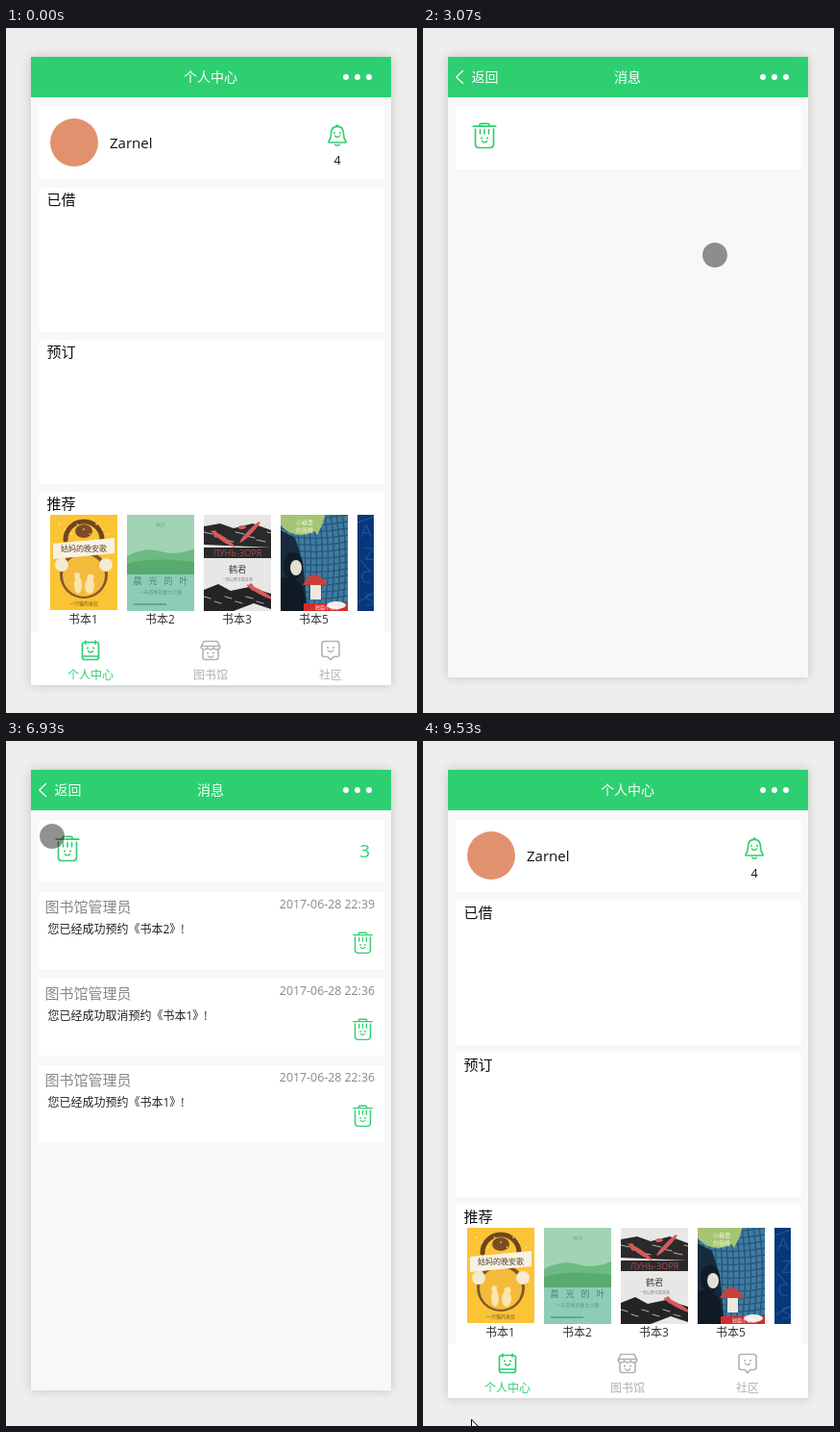
Recreate the animation shown at these times as an HTML page with a canvas. Size 428 px wide and 712 px high, loop 9.79 s.

```html
<!DOCTYPE html>
<html lang="zh-CN">
<head>
<meta charset="utf-8">
<title>个人中心</title>
<style>
html, body { margin: 0; width: 100%; height: 100%; overflow: hidden; background: #eee; }
canvas { display: block; width: 428px; height: 712px; }
</style>
</head>
<body>
<canvas id="stage"></canvas>
<script>
const W = 428, H = 712, LOOP = 9790, STEP = 1000 / 15;
const GREEN = '#2ecf71', GREY = '#b2b2b2', PAGE = '#f8f8f8';
const FONT = '"Open Sans", "Noto Sans CJK SC", "Noto Sans CJK", sans-serif';
const canvas = document.getElementById('stage');
const ctx = canvas.getContext('2d');
const dpr = window.devicePixelRatio || 1;
canvas.width = W * dpr;
canvas.height = H * dpr;

// Pointer path: time, x, y
const PATH = [
  [0, 500, 690], [70, 410, 586], [130, 370, 455], [200, 329, 270], [270, 350, 134],
  [330, 374, 141], [400, 374, 141], [730, 328, 108], [1800, 328, 108],
  [2330, 401, 195], [2400, 396, 205], [3070, 304, 236], [3600, 320, 236],
  [4000, 354, 218], [4130, 357, 204], [4200, 357, 204], [4270, 361, 201],
  [4870, 361, 201], [5200, 180, 145], [5470, 48, 99], [7800, 48, 99],
  [7870, 48, 81], [8070, 55, 60], [8270, 45, 44], [8530, 45, 44],
  [9000, 60, 350], [9530, 50, 705], [LOOP, 50, 705]
];

const NOTES = [
  ['取消预约《书本2》', '22:40'], ['预约《书本2》', '22:39'],
  ['取消预约《书本1》', '22:36'], ['预约《书本1》', '22:36']
];

function rect(x, y, w, h, color) {
  ctx.fillStyle = color;
  ctx.fillRect(x, y, w, h);
}

function disc(x, y, r, color) {
  ctx.fillStyle = color;
  ctx.beginPath();
  ctx.arc(x, y, r, 0, Math.PI * 2);
  ctx.fill();
}

function oval(x, y, rx, ry, color, turn = 0) {
  ctx.fillStyle = color;
  ctx.beginPath();
  ctx.ellipse(x, y, rx, ry, turn, 0, Math.PI * 2);
  ctx.fill();
}

function text(str, x, y, size, color, align = 'left') {
  ctx.font = size + 'px ' + FONT;
  ctx.textAlign = align;
  ctx.fillStyle = color;
  ctx.fillText(str, x, y);
}

function stroke(d, color, width) {
  ctx.strokeStyle = color;
  ctx.lineWidth = width;
  ctx.lineCap = ctx.lineJoin = 'round';
  ctx.stroke(new Path2D(d));
}

function fill(d, color) {
  ctx.fillStyle = color;
  ctx.fill(new Path2D(d));
}

function at(x, y, scale, draw) {
  ctx.save();
  ctx.translate(x, y);
  ctx.scale(scale, scale);
  draw();
  ctx.restore();
}

function clipped(x, y, w, h, draw) {
  ctx.save();
  ctx.beginPath();
  ctx.rect(x, y, w, h);
  ctx.clip();
  draw();
  ctx.restore();
}

function face(x, y, color) {
  disc(x - 3, y, 1.1, color);
  disc(x + 3, y, 1.1, color);
  stroke(`M${x - 2.6} ${y + 3}q2.6 3 5.2 0`, color, 1.4);
}

function trash(x, y, scale) {
  at(x, y, scale, () => {
    stroke('M.8 3.7H24.2M7.5 3.5V2Q7.5 .8 9 .8H16Q17.5 .8 17.5 2V3.5', GREEN, 1.7);
    stroke('M3 6.5V22Q3 26 7 26H18Q22 26 22 22V6.5', GREEN, 1.7);
    stroke('M8 7V11.5M12.5 7V11.5M17 7V11.5', GREEN, 1.6);
    face(12.5, 16, GREEN);
  });
}

function bell() {
  at(345, 111, 1, () => {
    stroke('M-1.5 -8.5Q0 -11.5 1.5 -8.5M-9 7Q-6.5 4 -6.5 -1C-6.5 -6 -4 -8.6 0 -8.6S6.5 -6 6.5 -1Q6.5 4 9 7Q9.5 8 8.3 8H-8.3Q-9.5 8 -9 7ZM-2.2 10.3Q0 11.8 2.2 10.3', GREEN, 1.6);
    face(0, -2, GREEN);
  });
}

function tabIcon(x, kind, color) {
  at(x, 647, 1, () => {
    if (kind === 0) {
      stroke('M-6 -8.5H6Q8.5 -8.5 8.5 -6V7Q8.5 9.5 6 9.5H-6Q-8.5 9.5 -8.5 7V-6Q-8.5 -8.5 -6 -8.5M-5 -10V-7M5 -10V-7M-8 6H8', color, 1.7);
      face(0, -2.5, color);
    } else if (kind === 1) {
      stroke('M-7 -9.5H7L9.8 -4Q9.8 -1 6.7 -1T3.3 -3Q3 -1 0 -1T-3.3 -3Q-3.5 -1 -6.7 -1T-9.8 -4ZM-8 0V7Q-8 9.5 -5.5 9.5H5.5Q8 9.5 8 7V0M-9 -4.5H9', color, 1.6);
      face(0, 2.7, color);
    } else {
      stroke('M-6.5 -9.5H6.5Q9 -9.5 9 -7V4Q9 6.5 6.5 6.5H3L0 9.7L-3 6.5H-6.5Q-9 6.5 -9 4V-7Q-9 -9.5 -6.5 -9.5', color, 1.6);
      face(0, -3, color);
    }
  });
}

const COVERS = [
  () => {
    rect(0, 0, 70, 99, '#fbc435');
    stroke('M16 26A19 19 0 0 1 54 26', '#70451f', 5);
    oval(35, 17, 9, 7, '#7b4d22');
    for (let i = 0; i < 9; i++) disc(9 + i * 6.5, 10 + (i % 3) * 5, .8, '#fff3c4');
    disc(35, 62, 25, '#80572c');
    disc(35, 63, 22, '#f4bb3b');
    disc(12, 52, 7, '#f5ead2');
    disc(58, 52, 7, '#f5ead2');
    fill('M3 30L67 24V40L3 46Z', '#f8f2e5');
    text('姑妈的晚安歌', 35, 38, 8, '#594229', 'center');
    oval(29, 73, 4, 9, '#f9e5ad');
    oval(41, 74, 5, 8, '#f9e5ad');
    disc(28, 63, 3, '#f9e5ad');
    disc(42, 65, 3.5, '#f9e5ad');
    text('一只猫的来信', 35, 94, 5, '#795722', 'center');
  },
  () => {
    rect(0, 0, 70, 100, '#a0d4b5');
    fill('M0 43Q18 33 35 38T70 35V63H0Z', '#6dbb83');
    fill('M0 51Q25 43 70 49V63H0Z', '#57aa70');
    rect(0, 62, 70, 38, '#8ecbb8');
    text('林间', 35, 12, 5, '#72aa8a', 'center');
    ['晨', '光', '的', '叶'].forEach((c, i) => text(c, 11 + i * 16, 72, 9, '#438b70', 'center'));
    text('一年四季的散文小集', 35, 82, 5, '#5a9f89', 'center');
    rect(7, 92, 34, 2, '#62a991');
  },
  () => {
    rect(0, 0, 70, 100, '#e8e7e6');
    fill('M0 12L17 9L31 14L51 9L70 16V34L0 31Z', '#2b292b');
    rect(0, 34, 70, 11, '#2b292b');
    fill('M0 78L15 72L28 79L47 75L70 82V98L52 92L31 100H0Z', '#242326');
    for (let i = 0; i < 7; i++) stroke(`M${i * 11} ${18 + i % 3 * 4}l9 2M${i * 11} ${85 + i % 2 * 5}l7 2`, '#d6d4d1', .8);
    [[20, 25, .6], [48, 18, -.8], [58, 80, .5]].forEach(([x, y, a]) => {
      oval(x, y, 15, 2.3, '#d65a5b', a);
      oval(x - 8, y - 5, 4, 2, '#d65a5b', a + .7);
    });
    text('ЛУНЬ-ЗОРЯ', 35, 43, 9, '#a94e4c', 'center');
    text('鹤君', 35, 60, 9, '#403d3d', 'center');
    text('一部山野长篇故事', 35, 69, 4, '#888', 'center');
  },
  () => {
    rect(0, 0, 70, 100, '#407ba3');
    for (let i = 0; i < 14; i++) stroke(`M${i * 6 - 8} 0q7 45 0 100M0 ${i * 7}q35 7 70 0`, '#285878', 1.5);
    fill('M0 16L15 24L23 49L28 100H0Z', '#172b3c');
    disc(21, -5, 26, '#a5c575');
    fill('M32 12L45 7L38 21Z', '#a5c575');
    text('小巷里', 25, 10, 6, '#f4f7df', 'center');
    text('的夜晚', 25, 18, 6, '#f4f7df', 'center');
    oval(13, 53, 10, 14, '#111c27');
    oval(16, 55, 6, 8, '#e4dfd6');
    fill('M0 67Q14 60 23 75L27 100H0Z', '#101a24');
    rect(24, 92, 46, 8, '#d72c2a');
    fill('M23 73Q34 51 49 73Z', '#c9403a');
    rect(31, 73, 11, 15, '#eee9df');
    oval(58, 94, 10, 4, '#eee');
    text('短篇小说集', 36, 98, 5, '#fff');
  },
  () => {
    rect(0, 0, 70, 100, '#083779');
    ['A', 'Z', 'C', 'S'].forEach((c, i) => text(c, 3 + (i % 2) * 4, 23 + i * 24, 19, '#174f9a'));
    stroke('M0 8L17 2M3 47L14 60M0 91L17 81', '#245d9d', 1);
  }
];

function header(title, back) {
  rect(26, 30, 375, 42, GREEN);
  text(title, 213, 56, 14, '#fff', 'center');
  [354, 366, 378].forEach(x => disc(x, 51, 3, '#fff'));
  if (back) {
    stroke('M41.5 44.5L34.7 51L41.5 57.5', '#fff', 1.2);
    text('返回', 50.5, 56, 14, '#fff');
  }
}

function phone(bottom, color) {
  ctx.save();
  ctx.shadowColor = 'rgba(0,0,0,.18)';
  ctx.shadowBlur = 10 * dpr;
  rect(26, 30, 375, bottom - 30, color);
  ctx.restore();
}

function card(y, h, title) {
  rect(34, y, 360, h, '#fff');
  if (title) text(title, 42.5, y + 18, 15, '#111');
}

function homePage() {
  phone(683, PAGE);
  header('个人中心', false);
  card(82, 75);
  disc(71, 119, 25, '#e2916e');
  text('Zarnel', 108, 125, 15, '#111');
  bell();
  text('4', 345, 142, 12.5, '#111', 'center');
  card(166, 150, '已借');
  card(324, 150, '预订');
  card(482, 145, '推荐');
  clipped(46, 506, 337, 100, () => {
    COVERS.forEach((draw, i) => at(46 + i * 80, 506, 1, () => clipped(0, 0, 70, 100, draw)));
  });
  [1, 2, 3, 5].forEach((n, i) => text('书本' + n, 80.5 + i * 80, 619, 12, '#333', 'center'));
  rect(26, 627, 375, 56, '#fff');
  ['个人中心', '图书馆', '社区'].forEach((label, i) => {
    const x = 88 + i * 125, color = i ? GREY : GREEN;
    tabIcon(x, i, color);
    text(label, x, 677, 12, color, 'center');
  });
}

function toast(label) {
  ctx.fillStyle = 'rgba(40,40,40,.75)';
  ctx.beginPath();
  ctx.roundRect(152, 210, 122, 122, 5);
  ctx.fill();
  disc(213, 253.5, 25.5, '#fff');
  fill('M200.5 255L203.5 252.5L209 257.5L225.5 245L227.5 247L209.5 263.5Z', '#5c5c5c');
  text(label, 213, 309, 16, '#fff', 'center');
}

function messagePage(t) {
  const loaded = t >= 2590;
  phone(675, loaded ? PAGE : '#fff');
  header('消息', true);
  if (!loaded) {
    const p = t < 1600 ? (t - 1400) / 200 * .47 : .47 + .5 * (1 - Math.exp(-(t - 1600) / 450));
    rect(26, 72, 375 * p, 2, '#4fb83f');
    return;
  }
  card(82, 65);
  trash(51.5, 98.5, 1);
  if (t < 3530) return;
  const list = t < 4595 ? NOTES : t < 7325 ? NOTES.slice(1) : [];
  text(String(list.length), 379, 121, 19, GREEN, 'right');
  list.forEach(([what, time], i) => {
    const y = 157 + i * 90;
    card(y, 80);
    text('图书馆管理员', 40.5, y + 20.5, 15, '#888');
    text('2017-06-28 ' + time, 384, y + 17, 12.35, '#888', 'right');
    text('您已经成功' + what + '!', 43.5, y + 43, 12, '#222');
    trash(361, y + 41.5, .84);
  });
  if (t >= 4925 && t < 6925) toast('删除成功');
  if (t >= 7325) toast('删除所有成功');
}

function pointer(t, bottom) {
  let i = 1;
  while (i < PATH.length - 1 && PATH[i][0] < t) i++;
  const [t0, x0, y0] = PATH[i - 1], [t1, x1, y1] = PATH[i];
  const p = Math.min(1, (t - t0) / (t1 - t0));
  const x = x0 + (x1 - x0) * p, y = y0 + (y1 - y0) * p;
  if (x >= 400.5 || y >= bottom) {
    at(x, y, 1, () => {
      const d = 'M.5 .5V16.5L4.2 13L6.7 18.5L9 17.5L6.5 12H11.5Z';
      fill(d, '#fff');
      stroke(d, '#000', 1);
    });
    return;
  }
  clipped(26, 30, 375, bottom - 30, () => {
    disc(x, y, 13, 'rgba(0,0,0,.43)');
    ctx.strokeStyle = 'rgba(255,255,255,.3)';
    ctx.lineWidth = 1.5;
    ctx.beginPath();
    ctx.arc(x, y, 13.7, 0, Math.PI * 2);
    ctx.stroke();
  });
}

function render(now) {
  const tick = Math.floor((now % LOOP + 4) / STEP);
  const t = Math.min(LOOP, Math.round(tick * STEP / 10) * 10);
  const home = t < 1395 || t >= 8595;
  ctx.setTransform(dpr, 0, 0, dpr, 0, 0);
  rect(0, 0, W, H, '#eee');
  if (home) homePage();
  else messagePage(t);
  pointer(t, home ? 683 : 675);
}

let start = null;
function frame(now) {
  if (start === null) start = now;
  render(now - start);
  requestAnimationFrame(frame);
}
render(0);
requestAnimationFrame(frame);
</script>
</body>
</html>
```
